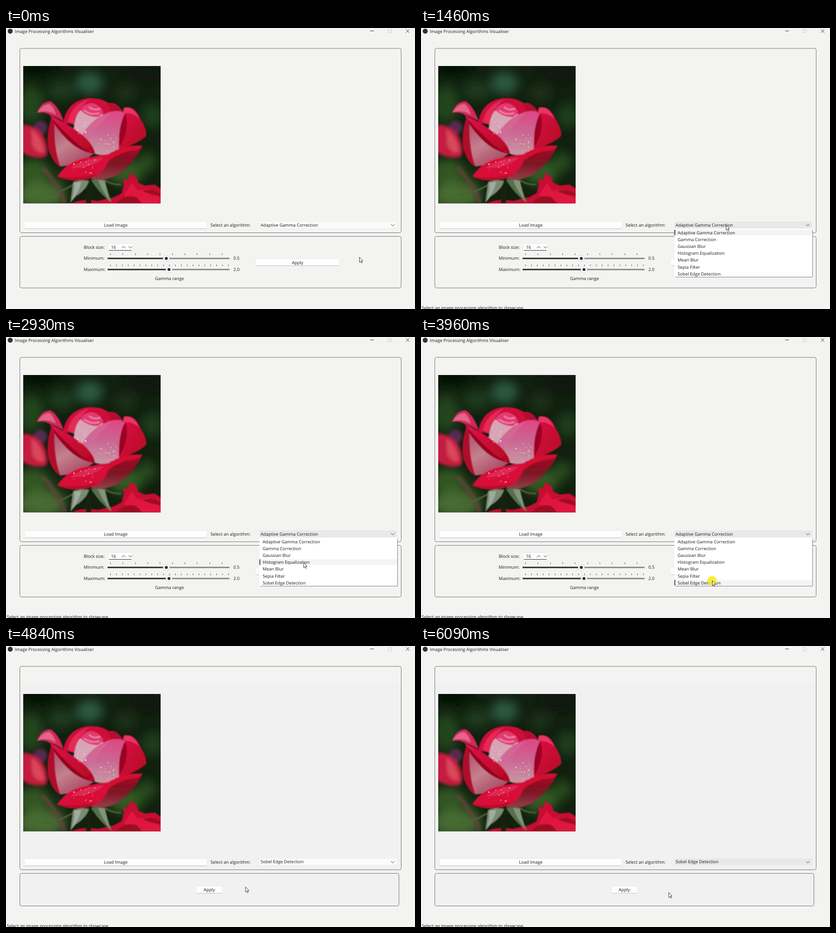
These frames come from a looping animation (902x621 px, 8000 ms). An HTML page:

```html
<!DOCTYPE html>
<html lang="en">
<head>
<meta charset="utf-8">
<title>Image Processing Algorithms Visualiser</title>
<style>
html, body { margin: 0; width: 100%; height: 100%; overflow: hidden; background: #f3f3f2; }
svg { display: block; width: 100%; height: 100%; }
text { font: 9.6px "Open Sans", "Noto Sans", sans-serif; fill: #1c1c1c; text-rendering: geometricPrecision; }
.mid { text-anchor: middle; }
.panel { fill: none; stroke: #707070; }
.btn { fill: #fdfdfd; stroke: #e9e9e9; }
.line { fill: none; stroke: #333; }
</style>
</head>
<body>
<svg viewBox="0 0 902 621" preserveAspectRatio="none">
  <defs>
    <clipPath id="crop"><rect width="303" height="303.5"/></clipPath>
    <filter id="soft" x="-60%" y="-60%" width="220%" height="220%"><feGaussianBlur stdDeviation="11"/></filter>
    <filter id="haze" x="-20%" y="-20%" width="140%" height="140%"><feGaussianBlur stdDeviation="3"/></filter>
    <filter id="edge"><feGaussianBlur stdDeviation=".8"/></filter>
    <linearGradient id="pale" x1=".3" y1="0" x2=".2" y2="1">
      <stop offset="0" stop-color="#dc4a86"/><stop offset=".45" stop-color="#cb6792"/><stop offset="1" stop-color="#c79aa6"/>
    </linearGradient>
    <linearGradient id="shade" x1="0" y1="0" x2=".6" y2="1">
      <stop offset="0" stop-color="#b0506c"/><stop offset=".5" stop-color="#c4808f"/><stop offset="1" stop-color="#a84862"/>
    </linearGradient>
    <linearGradient id="red" x1="0" y1="0" x2="1" y2="1">
      <stop offset="0" stop-color="#e2144c"/><stop offset="1" stop-color="#b00420"/>
    </linearGradient>
    <linearGradient id="dark" x1="0" y1="0" x2="0" y2="1">
      <stop offset="0" stop-color="#a80a26"/><stop offset=".5" stop-color="#7d1422"/><stop offset="1" stop-color="#93404a"/>
    </linearGradient>
  </defs>

  <rect width="902" height="621" fill="#f3f3f1"/>
  <rect id="repaint" x="30" y="84" width="842" height="491" fill="#f1f1f1"/>
  <circle cx="9.3" cy="7" r="5.5" fill="#333"/>
  <text x="19.5" y="10.5">Image Processing Algorithms Visualiser</text>
  <path class="line" d="M803 6.5h8.5M882 3l7.5 7.5m0-7.5l-7.5 7.5"/>
  <rect x="842.5" y="3.5" width="7" height="7" rx="1" fill="none" stroke="#c6c6c6"/>

  <rect class="panel" id="top" x="30.5" y="45" width="841" rx="4"/>
  <rect class="panel" id="bottom" x="30.5" rx="4"/>

  <g id="photo"><g clip-path="url(#crop)">
    <rect width="303" height="304" fill="#11200f"/>
    <g filter="url(#soft)">
      <ellipse cx="146" cy="38" rx="30" ry="25" fill="#2c5940"/>
      <ellipse cx="85" cy="55" rx="30" ry="22" fill="#1d3a1a"/>
      <ellipse cx="18" cy="85" rx="28" ry="42" fill="#21441c"/>
      <ellipse cx="22" cy="235" rx="36" ry="30" fill="#335722"/>
      <ellipse cx="40" cy="285" rx="55" ry="30" fill="#466b33"/>
      <ellipse cx="225" cy="235" rx="40" ry="28" fill="#315a22"/>
      <ellipse cx="272" cy="212" rx="22" ry="22" fill="#25481c"/>
      <ellipse cx="285" cy="110" rx="24" ry="28" fill="#1e3c1b"/>
      <ellipse cx="225" cy="60" rx="24" ry="18" fill="#1a3318"/>
      <ellipse cx="30" cy="5" rx="50" ry="16" fill="#060b06"/>
      <ellipse cx="270" cy="15" rx="45" ry="18" fill="#0a120a"/>
      <ellipse cx="75" cy="245" rx="18" ry="18" fill="#1a3016"/>
    </g>
    <g filter="url(#haze)">
      <circle cx="38" cy="136" r="15" fill="#55294f"/>
      <path d="M-5 130Q25 128 45 155Q58 185 50 200Q25 208-5 190Z" fill="#c41a40"/>
      <path d="M18 140Q42 155 46 190Q30 195 20 175Z" fill="#d8475a"/>
      <path d="M42 225Q70 250 92 303" fill="none" stroke="#60433a" stroke-width="8"/>
    </g>
    <g filter="url(#edge)">
      <path d="M108 303Q130 292 165 298L200 290 217 281 222 262 220 248 230 252 237 236 250 246 254 258 268 264 290 262 305 272V305H108Z" fill="#c60a30"/>
      <path d="M222 285L240 258 252 275 275 272 303 292V303H240Z" fill="#e0183f"/>
      <path d="M205 303Q225 282 250 290L262 303ZM262 276Q285 270 303 282V288Q280 285 262 276Z" fill="#9c0822"/>
      <path d="M137 250H152L150 304H138Z" fill="#17200f"/>
      <path d="M50 285Q80 282 118 258M180 252Q195 263 216 262" fill="none" stroke="#4a6134" stroke-width="3.500"/>
      <path d="M110 256Q130 250 145 254Q138 275 116 288L104 302Q107 275 110 256Z" fill="#7a8b74"/>
      <path d="M112 258Q115 272 107 298Q124 276 128 256Z" fill="#a0aca0"/>
      <path d="M150 252Q168 250 180 252Q186 278 195 302Q166 280 150 252Z" fill="#566f4c"/>
      <path d="M165 252L180 253Q185 278 193 300Q174 276 165 252Z" fill="#829479"/>
      <path d="M88 126Q96 76 145 71Q172 70 188 82Q206 78 219 100L165 135Z" fill="#cf0d3a"/>
      <path d="M98 122Q108 84 145 74Q118 94 112 130Z" fill="#e32b57"/>
      <path d="M186 84Q205 80 217 98L196 103Z" fill="#b40a30"/>
      <path d="M62 115Q50 150 55 182Q64 212 80 222L112 185Z" fill="#b00a2c"/>
      <path d="M208 185Q202 145 222 92Q245 86 258 116Q274 142 271 155Q250 174 208 185Z" fill="url(#red)"/>
      <path d="M212 135Q216 110 226 106Q236 140 212 180Z" fill="#9c0624"/>
      <path d="M222 92Q243 88 256 116Q240 102 222 104Z" fill="#e83565"/>
      <path d="M30 104Q40 78 60 78Q78 88 89 122Q72 112 58 108Q46 100 30 104Z" fill="#d4265a"/>
      <path d="M32 102Q43 84 58 84Q68 92 72 108Q55 96 32 102Z" fill="#e2658a"/>
      <path d="M69 128Q68 185 82 222Q125 218 158 192Z" fill="url(#shade)"/>
      <path d="M110 148Q114 108 126 98Q150 100 180 108L138 165Z" fill="#d8a5b6"/>
      <path d="M126 98Q132 84 150 82Q168 84 177 103L165 113Q145 114 126 98Z" fill="#e03a72"/>
      <path d="M145 90Q155 100 170 94M134 98Q150 110 168 104" fill="none" stroke="#f088aa" stroke-width="3"/>
      <path d="M126 158Q150 116 190 102Q212 96 224 105Q208 138 211 185Q185 202 157 194Z" fill="url(#pale)"/>
      <path d="M126 158Q152 118 194 102Q170 124 140 166Z" fill="#d56c98" opacity=".7"/>
      <path d="M59 109Q95 124 130 152Q156 174 159 195Q128 190 98 162Q70 138 59 109Z" fill="url(#red)"/>
      <path d="M62 114Q90 146 122 174Q140 188 157 194Q124 190 96 162Q72 138 62 114Z" fill="#96061f"/>
      <path d="M150 250Q166 215 192 192Q225 175 262 178Q248 210 212 238Q180 257 150 250Z" fill="url(#dark)"/>
      <path d="M190 194Q225 172 263 176Q258 186 240 187Q212 190 184 213Z" fill="#d40a30"/>
      <path d="M75 244Q98 207 150 201Q180 194 191 196Q187 225 165 241Q120 264 75 244Z" fill="#d80c38"/>
      <path d="M104 226Q130 206 178 202Q155 225 104 226Z" fill="#e44a70" opacity=".5"/>
      <path d="M78 245Q120 250 168 238Q120 264 78 245Z" fill="#b4082a"/>
    </g>
    <g id="drops" fill="#f6dfe8"></g>
  </g></g>

  <g id="bar">
    <rect class="btn" x="40.5" y="427.5" width="403" height="15.5" rx="2"/>
    <path d="M42 443.5H442" stroke="#c4c4c4"/>
    <text class="mid" x="242" y="439">Load Image</text>
    <text x="451" y="439">Select an algorithm:</text>
    <rect id="combo" x="559.5" y="428.5" width="302" height="13" rx="2"/>
    <text id="choice" x="561.5"></text>
    <path class="line" d="M849 433.5l4 4 4-4"/>
  </g>

  <g id="gamma">
    <text x="171.5" y="487.5">Block size:</text>
    <rect class="btn" x="225.5" y="476.5" width="55" height="14.5" rx="2"/>
    <path class="line" d="M227 491.5H277M255.5 486.5l4-4 4 4M270.5 482.5l4 4 4-4"/>
    <text x="231.5" y="488">16</text>
    <g id="sliders"></g>
    <text class="mid" x="360.5" y="557">Gamma range</text>
    <rect class="btn" x="550.5" y="509.5" width="185" height="15.5" rx="2"/>
    <path d="M552 525.5H734" stroke="#c4c4c4"/>
    <text class="mid" x="643" y="521.5">Apply</text>
  </g>

  <g id="sobel">
    <rect class="btn" id="button" x="419.5" y="530.5" width="58" height="15.5" rx="2"/>
    <path d="M421 546.5H476" stroke="#c4c4c4"/>
    <text class="mid" id="apply" x="448.3" y="542.3">Apply</text>
  </g>

  <g id="popup">
    <rect x="559" y="444" width="305" height="107" fill="#fff"/>
    <path d="M863.5 446V550.5H561" fill="none" stroke="#7c7c7c"/>
    <g id="hot"><rect x="560" width="302.5" height="12.5" fill="#f4f4f4"/><rect x="559" width="1.6" height="12.5" fill="#222"/></g>
    <g id="items"></g>
  </g>

  <text id="status" x="1.8" y="621.5">Select an image processing algorithm to showcase.</text>
  <circle id="click" r="10.3" fill="#f8ee20" opacity=".9"/>
  <path id="cursor" d="M.5.5V11.8L3 9.4 4.7 13.2 6.5 12.4 4.8 8.7H8Z" fill="#fff" stroke="#222" stroke-width=".9"/>
</svg>
<script>
const $ = id => document.getElementById(id);
const LOOP = 8000, OPEN = 1370, PICK = 4090, PRESS = 5460, RELEASE = 5560, ROW = 15.15;
const names = ["Adaptive Gamma Correction", "Gamma Correction", "Gaussian Blur", "Histogram Equalization",
  "Mean Blur", "Sepia Filter", "Sobel Edge Detection"];

// Pointer moves: start, end, target x, target y
const home = [779, 506];
const moves = [
  [380, 960, 672.5, 435], [1940, 2660, 656, 498], [2940, 3220, 650, 531], [3490, 3620, 642, 538],
  [4480, 4840, 528, 532], [4840, 5150, 463, 533], [5820, 6090, 546, 544]
];

$("items").innerHTML = names.map((n, i) => `<text x="566" y="${455.8 + i * ROW}">${n}</text>`).join("");

function slider(label, value, y, knob, count, step) {
  const ticks = Array.from({ length: count }, (_, i) => `M${Math.round(230 + i * step) + .5} ${y - 11}v3.5`).join("");
  return `<text x="171.5" y="${y + 3}">${label}</text><text x="501.5" y="${y + 3}">${value}</text>
    <path d="${ticks}" stroke="#444"/>
    <path d="M224 ${y}H493" stroke="#868686" stroke-width="3"/><path d="M224 ${y}H${knob}" stroke="#333" stroke-width="3"/>
    <circle cx="${knob}" cy="${y}" r="6.8" fill="#fff" stroke="#d2d2d2"/><circle cx="${knob}" cy="${y}" r="3.3" fill="#2c2c2c"/>`;
}
$("sliders").innerHTML = slider("Minimum:", "0.5", 509.2, 353.5, 10, 27.35) + slider("Maximum:", "2.0", 533.8, 359.5, 21, 12.98);

let seed = 7;
const rand = () => (seed = seed * 16807 % 2147483647) / 2147483647;
function dots(n, x, y, w, h) {
  let s = "";
  for (let i = 0; i < n; i++) {
    s += `<circle cx="${x + rand() * w}" cy="${y + rand() * h}" r="${.6 + rand() * 1.2}" opacity="${.3 + rand() * .5}"/>`;
  }
  return s;
}
$("drops").innerHTML = dots(24, 148, 150, 56, 42) + dots(14, 118, 118, 22, 32) + dots(14, 100, 207, 60, 32);

// Nearly steady, a little slower at both ends
const ease = p => p - Math.sin(2 * Math.PI * p) * .07;
function pointer(t) {
  let [x, y] = home;
  for (const [a, b, tx, ty] of moves) {
    const p = ease(Math.min(1, Math.max(0, (t - a) / (b - a))));
    x += (tx - x) * p;
    y += (ty - y) * p;
  }
  return [x, y];
}

const show = (id, on) => $(id).setAttribute("display", on ? "inline" : "none");
const set = (id, attrs) => { for (const k in attrs) $(id).setAttribute(k, attrs[k]); };

function draw(t) {
  const [x, y] = pointer(t), picked = t >= PICK;
  const over = t > 380 && y < 443, open = t >= OPEN && !picked;
  const lit = over || open || t >= PRESS;

  show("repaint", picked);
  set("top", { height: picked ? 449.5 : 407.5 });
  set("bottom", picked ? { y: 502.5, width: 836, height: 72 } : { y: 460.5, width: 841, height: 114 });
  set("photo", { transform: `translate(38 ${picked ? 106 : 84})` });
  set("bar", { transform: `translate(0 ${picked ? 42 : 0})` });
  set("combo", { fill: lit ? "#e9e9e9" : "#fbfbfb", stroke: lit ? "#e2e2e2" : "#f7f7f7" });
  set("choice", { y: picked ? 438 : 439 });
  $("choice").textContent = names[picked ? 6 : 0];
  show("gamma", !picked);
  show("sobel", picked);
  set("apply", { "fill-opacity": t >= PRESS && t < RELEASE ? .6 : 1 });

  show("popup", open);
  const row = Math.min(6, Math.max(0, Math.floor((y - 444.5) / ROW)));
  set("hot", { transform: `translate(0 ${445.8 + row * ROW})` });
  show("status", over || t >= 960);

  show("click", (t >= 1270 && t < 1460) || (t >= 3960 && t < PICK));
  set("click", { cx: x, cy: y + .5 });
  set("cursor", { transform: `translate(${x} ${y})` });
}

const start = performance.now();
function tick() {
  draw((performance.now() - start) % LOOP);
  requestAnimationFrame(tick);
}
tick();
</script>
</body>
</html>
```
